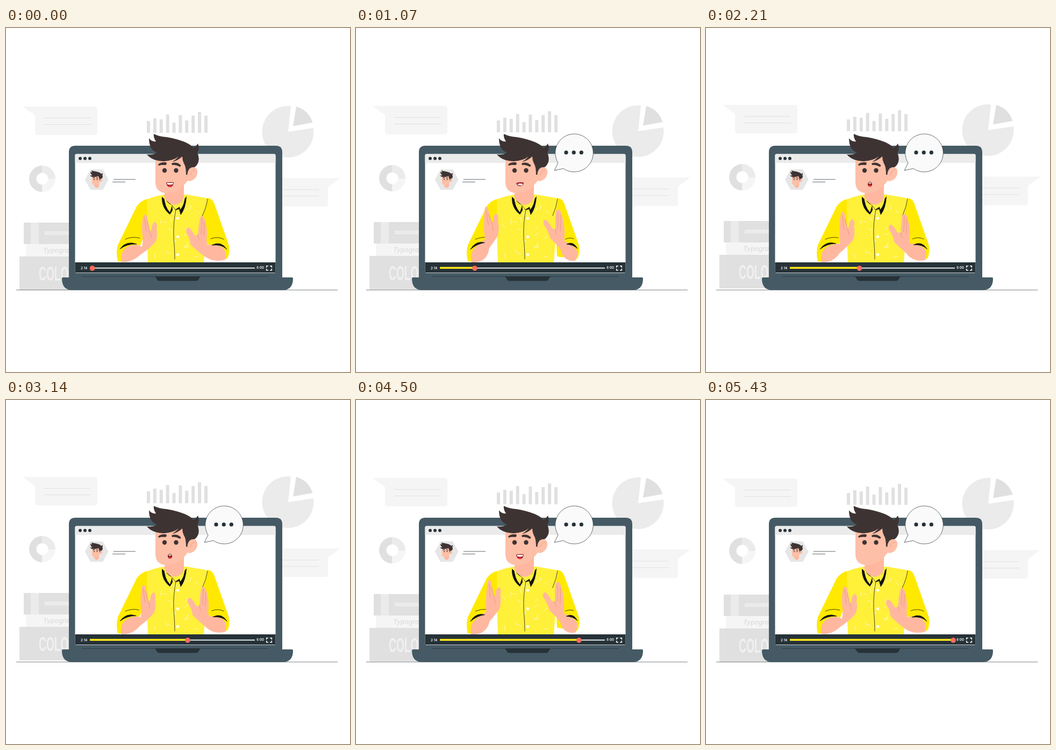
Write an HTML page that moves like this. It is 640 px wide and 640 px high and loops after 5.5 s.

```html
<!DOCTYPE html>
<html lang="en">
<head>
<meta charset="utf-8">
<title>Video call</title>
<style>
html,body{margin:0;width:100%;height:100%;overflow:hidden;background:#fff}
svg{display:block;width:100%;height:100%}
.ui{font:600 6px Inter,Roboto,sans-serif;fill:#fff}
.ink{fill:none;stroke:#1c1a12;stroke-linecap:round}
</style>
</head>
<body>
<svg viewBox="0 0 640 640">
  <defs>
    <g id="head">
      <path fill="#ffb89f" d="M298 296L294 314Q302 329 316 329Q326 327 331 315V288Z"/>
      <path fill="#fdbfa7" d="M278 238V288Q279 305 296 307Q316 308 327 296Q334 290 338 284L349 272L345 238Z"/>
      <path fill="#3e3333" d="M262 235Q272 237 281 232Q266 227 266 205Q271 212 279 211Q274 204 275 197Q284 202 299 203Q338 210 349 223Q354 220 357 215Q361 225 356 232Q360 240 358 249Q354 260 346 260Q339 262 338 273H335Q335 258 331 252Q328 246 328 239Q319 247 309 249Q316 245 321 239Q311 247 293 248Q271 247 262 235Z"/>
      <path fill="#fdbfa7" d="M338 268Q341 258 350 259Q357 261 356 270Q354 283 341 285L336 283Z"/>
      <path fill="none" stroke="#ee9c86" stroke-width=".8" d="M343 274Q345 265 352 264"/>
      <g fill="#3e3333">
        <circle cx="295" cy="265" r="4.2"/><circle cx="316.5" cy="265" r="4.2"/>
        <path d="M283 254Q288 249 298 250Q300 253 297 255Q290 254 284 256Z"/>
        <path d="M308 252Q317 248 325 255Q326 258 323 258Q316 254 309 255Z"/>
      </g>
    </g>
  </defs>

  <g id="backdrop"></g>

  <path stroke="#263238" stroke-width=".6" d="M19 487.4H617"/>
  <path fill="#455a64" d="M117 466V231Q117 219 129 219H502Q514 219 514 231V466Z"/>
  <path fill="#455a64" d="M106 464H532Q534 464 534 466Q534 487.5 515 487.5H123Q104 487.5 104 466Q104 464 106 464Z"/>
  <path stroke="#263238" stroke-width=".7" d="M141 462.3H489"/>
  <path fill="#263238" d="M277 462H362L358 468Q357 470.5 353 470.5H286Q282 470.5 281 468Z"/>
  <rect x="128.5" y="234.5" width="373" height="221.5" rx="2.5" fill="#fff"/>
  <path fill="#ebebeb" d="M128.5 251V237Q128.5 234.5 131 234.5H499Q501.5 234.5 501.5 237V251Z"/>
  <g fill="#263238"><circle cx="138" cy="242.7" r="2.9"/><circle cx="147" cy="242.7" r="2.9"/><circle cx="156" cy="242.7" r="2.9"/></g>

  <path fill="#e6e6e6" stroke="#e6e6e6" stroke-width="2" stroke-linejoin="round" d="M148 282L158 264H179.500L189.500 282L179.500 300H158Z"/>
  <use href="#head" transform="translate(91.300 216.300) scale(.247)"/>
  <path stroke="#263238" stroke-width=".7" d="M200 281.700H241M198 286.500H222"/>

  <path fill="#fff03a" d="M294 310L336 310L377 317L372 380L368 437H264L262 380L250 325Q268 314 294 310Z"/>
  <g id="dashes" stroke="#fffbc0" stroke-width="1" stroke-linecap="round"></g>
  <g id="limbs"></g>
  <path class="ink" stroke-width=".8" d="M316 338Q311 362 312 390Q314 412 314 430"/>
  <g fill="#fffde8"><circle cx="319.500" cy="354" r="2.800"/><circle cx="319.500" cy="388.500" r="2.800"/><circle cx="319.500" cy="421.500" r="2.800"/></g>
  <use href="#head"/>
  <path fill="#111" d="M290 314Q289 335 305 347L310 339L309 330ZM336 313Q335 335 325 348L322 337L315 339L322 330Z"/>
  <path fill="#fff03a" d="M294 312Q295 332 305 343L309 330Q297 324 294 312ZM333 311Q332 330 324 338L323 333L315 338L309 330Q330 330 333 311Z"/>
  <path class="ink" stroke-width=".7" d="M309 330L315 338L323 333"/>

  <g id="smile">
    <path fill="#9d1622" d="M298 287.500Q305 286.500 312 287Q311 296 305 296.300Q299 295.500 298 287.500Z"/>
    <path fill="#fff" d="M299.500 288.300L311 288L310 291Q305 292 300 291Z"/>
    <path fill="#e6353d" d="M301 294Q306 291.500 309 294Q307 296 305 296Q303 296 301 294Z"/>
  </g>
  <g id="teeth">
    <path fill="#9d1622" d="M298 289Q301 286 312 287.500Q312 294 305 294.300Q300 294 298 289Z"/>
    <path fill="#fff" d="M300 290.500Q305 288.500 310.500 290L309 292.800Q304 294 300 290.500Z"/>
  </g>
  <g id="round">
    <ellipse cx="305" cy="290.800" rx="4" ry="4.500" fill="#6e1218"/>
    <path fill="#fff" d="M302.500 288Q305 286.500 307.500 288V289.500H302.500Z"/>
    <ellipse cx="305" cy="293" rx="2.700" ry="2" fill="#e6353d"/>
  </g>

  <g id="bubble">
    <path fill="#fafafa" stroke="#263238" stroke-width=".7" d="M376 251L369 265L386 261.500A35.300 35.300 0 1 0 376 251Z"/>
    <g fill="#263238"><circle cx="391" cy="231.700" r="3.600"/><circle cx="405.200" cy="231.700" r="3.600"/><circle cx="419.300" cy="231.700" r="3.600"/></g>
  </g>

  <path fill="#263238" d="M128.500 436H501.500V455.300H128.500Z"/>
  <text class="ui" x="139" y="448.800">2:14</text>
  <text class="ui" x="466.300" y="448.300">6:00</text>
  <path fill="none" stroke="#fff" stroke-width="1.500" d="M488 442.700H484.700V445.700M491 442.700H494.300V445.700M488 450.700H484.700V447.700M491 450.700H494.300V447.700"/>
  <path stroke="#fff" stroke-width="1.800" d="M156 446.700H463"/>
  <path id="played" stroke="#ffe81a" stroke-width="3.400"/>
  <circle id="knob" cy="447" r="4.800" fill="#ff6b5e"/>
</svg>
<script>
const LOOP = 5500;
const $ = id => document.getElementById(id);

// Background
const note = `<path fill="#f5f5f5" d="M31 146H165Q170 146 170 151V194Q170 199 165 199H59Q54 199 54 194V163Z"/>
  <path stroke="#e0e0e0" stroke-width="1" d="M71 167.500H157M71 179.500H158"/>`;
const bars = [22, 27, 25, 34, 19, 33, 23, 32, 39, 32].map((h, i) =>
  `<rect x="${262 + i * 11.88}" y="${195 - h}" width="6" height="${h}"/>`).join('');
$('backdrop').innerHTML = `${note}
  <g transform="translate(653 133.300) scale(-1 1)">${note}</g>
  <g fill="#e0e0e0">${bars}
    <path d="M540 146Q563 153 570.500 176L534 182.500Z"/>
    <path d="M67.500 256A24.500 24.500 0 0 0 67.500 305V291.500A11 11 0 0 1 67.500 269.500Z"/>
    <path d="M33 362H130V402H33ZM25 425H130V487.500H25Z"/>
  </g>
  <g fill="#ebebeb">
    <path d="M530 145.300A48 48 0 1 0 572 186L525 193Z"/>
    <path d="M67.500 256A24.500 24.500 0 0 1 92 280.500L78.500 282A11 11 0 0 0 67.500 269.500Z"/>
    <path d="M46 362H61V402H46ZM72 378H130V385H72Z"/>
  </g>
  <path fill="#f5f5f5" d="M92 281A24.500 24.500 0 0 1 67.500 305V291.500A11 11 0 0 0 78.500 281ZM37 402H130V425H37Z"/>
  <text x="69" y="418" fill="#dcdcdc" style="font:italic 500 12px Inter,'Open Sans',sans-serif">Typography</text>
  <text transform="translate(61 470) scale(.52 1)" fill="#f0f0f0" style="font:bold 37px 'Liberation Sans',sans-serif">COLOR</text>`;

// Light flecks on the shirt
const hash = n => { const v = Math.sin(n * 127.1) * 43758.5453; return v - Math.floor(v); };
let flecks = '';
for (let i = 1; i <= 24; i++) {
  const a = hash(i + 60) * Math.PI, x = 270 + hash(i) * 92, y = 326 + (i - 1) * 4.3;
  flecks += `M${x} ${y}l${Math.cos(a) * 8} ${Math.sin(a) * 8}`;
}
$('dashes').innerHTML = `<path d="${flecks}"/>`;

// Arm parts: lowered pose, raised pose, look; hands also tilt
const skin = 'fill="#ffb89f"', sleeve = 'fill="#ffe900"', black = 'fill="#111" stroke="#111" stroke-width=".8"';
const line = 'class="ink" stroke-width=".8"', knuckle = 'fill="none" stroke="#e8927c" stroke-width=".8"';
const parts = [
  ['M262 318Q250 322 243 332L208 404Q204 418 208 434L217 435Q216 412 232 405L250 404L264 370L262 330Z',
   'M262 318Q250 322 243 332L208 404Q204 418 208 434L217 435Q216 412 232 403L243 396L262 355L262 334Z', sleeve],
  ['M377 316Q385 319 388 328L414 402Q417 414 413 427L408 431Q410 412 398 406L376 403L374 402L365 355Z',
   'M377 316Q385 319 388 328L414 402Q417 414 413 427L408 432Q410 418 398 420L386 430L374 428L372 350Z', sleeve],
  ['M375 318Q373 333 365 350', 'M375 318Q373 333 366 349', line],
  ['M222 393Q235 387 249 391', 'M222 393Q232 389 240 389', line],
  ['M381 392Q394 387 405 393', 'M391 393Q398 389 405 392', line],
  ['M214 435Q213 412 228 406Q242 400 253 407Q256 396 253 380Q252 365 255 350Q258 344 262 350Q266 365 267 378Q270 378 271 372Q272 362 277 361Q282 363 280 374Q283 388 278 398Q268 410 250 422Q232 438 214 435Z',
   'M214 436Q211 420 220 410Q229 399 240 392Q239 388 239 375Q240 355 243 336Q246 327 249 336Q252 348 254 362Q256 362 257 358Q259 345 264 346Q269 348 266 360Q268 376 264 388Q255 400 248 410Q245 438 214 436Z', skin, 1],
  ['M258 353Q259 366 261 379M262 358Q265 370 268 381Q271 386 270 390', 'M246 340Q246 356 248 366M250 346Q253 358 255 366Q257 372 256 378', knuckle, 1],
  ['M408 431Q411 413 400 406Q388 400 375 404Q372 398 374 385Q374 368 369 354Q364 346 361 354Q358 368 357 384Q353 388 350 384Q343 371 338 371Q333 374 336 382Q343 392 343 402Q352 412 368 424Q385 437 408 431Z',
   'M408 433Q416 418 409 410Q401 401 390 396Q389 390 390 380Q390 360 382 339Q377 333 373 340Q372 352 373 372Q370 374 366 370Q358 355 353 355Q348 358 352 365Q360 377 364 390Q377 402 382 410Q386 436 408 433Z', skin],
  ['M365 354Q364 370 363 383M369 360Q369 374 368 386M357 384Q357 390 360 394', 'M377 342Q378 358 377 373M382 346Q384 362 382 377M373 372Q373 379 376 384', knuckle],
  ['M212 411Q224 395 243 402Q226 401 212 411Z', 'M213 412Q223 395 239 399Q226 401 213 412Z', black],
  ['M383 404Q400 395 411 412Q402 402 383 404Z', 'M393 402Q405 396 412 410Q404 403 393 402Z', black]
];
$('limbs').innerHTML = parts.map(p => `<path ${p[2]}/>`).join('');
const limbs = [...$('limbs').children];

function blend(from, to, k) {
  const end = to.match(/\d+/g);
  let i = 0;
  return from.replace(/\d+/g, n => (+n + (end[i++] - n) * k).toFixed(2));
}

function mouthAt(t) {
  if (t > 5380) return '';
  const p = t % 800;
  if (p >= 150 && p < 400) return 'teeth';
  return p >= 560 && p < 770 ? 'round' : 'smile';
}

const wave = (t, period) => (1 - Math.cos(2 * Math.PI * t / period)) / 2;

function render(t) {
  $('backdrop').setAttribute('transform', `translate(0 ${-3.2 * wave(t, LOOP)})`);

  const lift = wave(t, LOOP / 2);
  const tilt = t < 2140 ? -3.5 * wave(t, 2140) : 0;
  parts.forEach(([low, high, , tilts], i) => {
    limbs[i].setAttribute('d', blend(low, high, lift));
    if (tilts) limbs[i].setAttribute('transform', `rotate(${tilt} 226 418)`);
  });

  const mouth = mouthAt(t);
  for (const id of ['smile', 'teeth', 'round']) $(id).style.display = id === mouth ? '' : 'none';

  const k = Math.min(1, Math.max(0, (t - 330) / 500));
  const grow = k * k * (3 - 2 * k);
  $('bubble').style.display = grow ? '' : 'none';
  $('bubble').setAttribute('transform', `translate(369 265) scale(${grow}) translate(-369 -265)`);

  const x = Math.min(460, 160.5 + t * 0.0565);
  $('knob').setAttribute('cx', x);
  $('played').setAttribute('d', `M156 446.300H${x}`);
}

const start = performance.now();
function tick() {
  render((performance.now() - start) % LOOP);
  requestAnimationFrame(tick);
}
tick();
</script>
</body>
</html>
```
